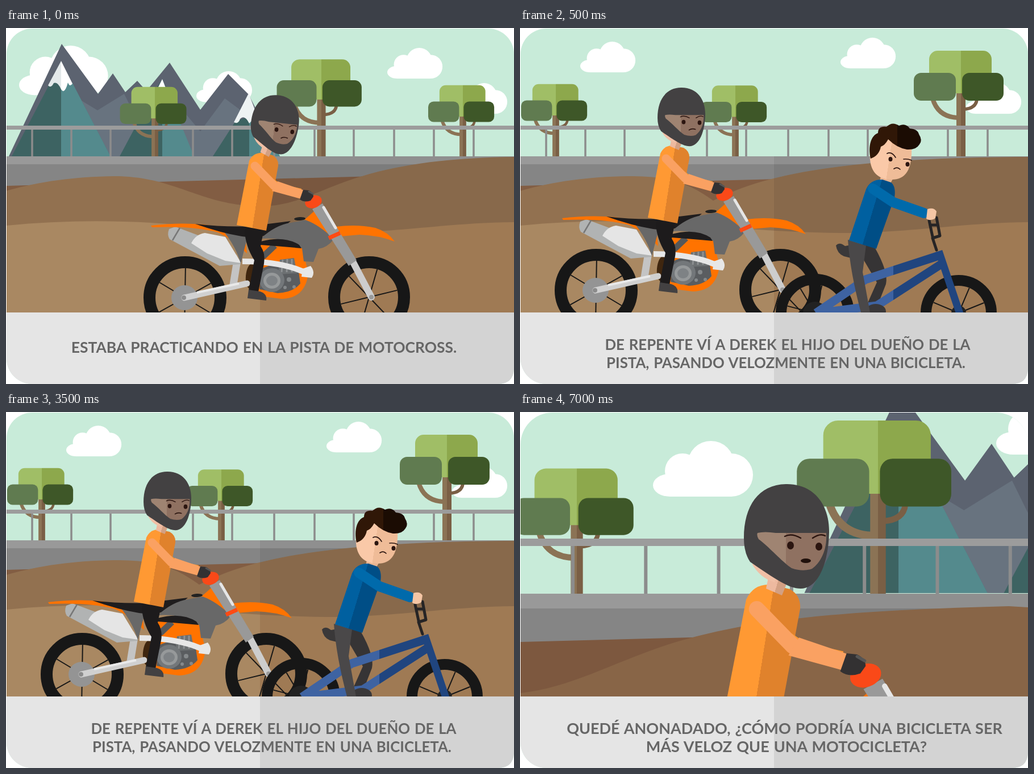
Animation, 894 px wide and 627 px high, one loop 8000 ms. Source, as an HTML page:

```html
<!DOCTYPE html>
<html lang="es">
<head>
<meta charset="utf-8">
<title>Pista de motocross</title>
<style>
  html, body { margin: 0; width: 100%; height: 100%; overflow: hidden; background: #fff; }
  svg { display: block; width: 894px; height: 627px; }
  text { font-family: Lato, sans-serif; font-weight: 700; word-spacing: 1.5px; fill: #666; text-anchor: middle; }
</style>
</head>
<body>
<svg id="stage" viewBox="0 0 894 627"></svg>
<script>
const shape = (d, fill) => `<path d="${d}" fill="${fill}"/>`;
const line = (d, color, width, cap = 'butt') =>
  `<path d="${d}" fill="none" stroke="${color}" stroke-width="${width}" stroke-linecap="${cap}" stroke-linejoin="round"/>`;
const oval = (x, y, rx, ry, fill, turn = 0) =>
  `<ellipse cx="${x}" cy="${y}" rx="${rx}" ry="${ry}" fill="${fill}" transform="rotate(${turn} ${x} ${y})"/>`;
const box = (x, y, w, h, fill, r = 0) =>
  `<rect x="${x}" y="${y}" width="${w}" height="${h}" rx="${r}" fill="${fill}"/>`;
const group = (transform, body) => `<g transform="${transform}">${body}</g>`;
const use = (id, x, y, s = 1) => `<use href="#${id}" transform="translate(${x} ${y}) scale(${s})"/>`;

// Two flat colours meeting at (x, y); (dx, dy) points from the first to the second.
const split = (id, x, y, dx, dy, a, b) =>
  `<linearGradient id="${id}" gradientUnits="userSpaceOnUse" x1="${x - dx}" y1="${y - dy}" x2="${x + dx}" y2="${y + dy}">
   <stop offset=".5" stop-color="${a}"/><stop offset=".5" stop-color="${b}"/></linearGradient>`;

const card = (id, r) => `<clipPath id="${id}"><path d="M1,${r + 1} a${r},${r} 0 0 1 ${r},${-r} H${894 - r}
  a${r},${r} 0 0 1 ${r},${r} V601 Q892,627 866,627 H46 A45,45 0 0 1 1,582 Z"/></clipPath>`;

const cloud = oval(30, 78, 30, 20, '#fff') + oval(52, 53, 31, 31, '#fff') + oval(102, 41, 41, 41, '#fff') +
  oval(138, 60, 38, 38, '#fff') + box(30, 50, 108, 48, '#fff');

const tree =
  line('M-50,-102 Q-40,-68 -3,-68', '#8b7355', 8) +
  line('M28,-100 Q26,-84 5,-83', '#7a5f45', 6) +
  box(-8, -130, 8, 140, '#8b7355') + box(0, -130, 8, 140, '#7a5f45') +
  box(-56, -186, 110, 75, 'url(#leaf)', 15) +
  box(-83, -147, 74, 49, '#607b50', 13) + box(2, -147, 73, 49, '#3e5728', 13);

const mountains =
  shape('M5,226 L98,28 L162,116 L188,80 L210,113 L231,93 L247,111 L288,61 L342,144 L391,81 L427,117 L482,226 Z', '#5c6370') +
  shape('M133,128 L161,145 L208,116 L262,226 H184 Z', '#68737f') +
  shape('M290,120 L342,182 L385,124 L420,150 L364,226 H300 Z', '#68737f') +
  shape('M10,226 L78,96 H97 V226 Z', '#3d6362') +
  shape('M97,88 L117,97 L184,226 H97 Z', '#548a8d') +
  shape('M97,58 L74,101 Q79,107 84,97 Q91,94 97,108 Z', '#e3e9ea') +
  shape('M97,58 L117,98 Q112,105 109,96 Q103,118 97,108 Z', '#fff') +
  shape('M200,226 L262,110 L275,90 V226 Z', '#3d6362') +
  shape('M275,90 L331,226 H275 Z', '#548a8d') +
  shape('M275,90 L264,112 L275,116 L283,111 Z', '#fff') +
  shape('M364,226 L404,164 L428,156 V226 Z', '#3d6362') +
  shape('M428,125 L482,226 H428 Z', '#548a8d') +
  shape('M427,115 L401,166 Q409,170 412,160 Q420,152 428,168 L442,154 Z', '#eef3f3');

const spokes = (x, y, r, start, count) => Array.from({ length: count }, (_, i) => {
  const a = start + i * 2 * Math.PI / count;
  return line(`M${x},${y} L${x + r * Math.cos(a)},${y + r * Math.sin(a)}`, '#171717', 2);
}).join('');
const wheel = (x, y, r, width, start, count) => spokes(x, y, r - width, start, count) +
  `<circle cx="${x}" cy="${y}" r="${r - width / 2}" fill="none" stroke="#171717" stroke-width="${width}"/>`;

const motorbike =
  wheel(315, 475, 73, 21, 0.54, 6) + wheel(639, 474, 72, 21, -0.24, 6) +
  oval(314, 475, 23, 22, '#949494') +
  line('M406,415 L400,452', '#c4c4c4', 13) +
  shape('M450,376 L520,385 L532,430 Q528,476 485,477 L446,472 L435,440 Z', '#ff7300') +
  shape('M449,424 L480,412 L514,422 L518,450 Q505,466 478,467 L446,460 Z', '#5a5d60') +
  shape('M482,408 L507,405 L512,432 L479,434 Z', '#6c7072') +
  line('M487,408 L485,430 M495,407 L494,430 M503,407 L503,430', '#8d9092', 3) +
  oval(468, 444, 22, 21, '#73777a') + oval(468, 445, 15, 14, '#96999a') + oval(468, 445, 10, 9, '#7e8285') +
  oval(498, 443, 4, 4, '#85898b') + oval(507, 456, 3, 3, '#85898b') + oval(491, 457, 3, 3, '#85898b') +
  line('M452,403 L473,383', '#55585a', 11) +
  oval(431, 437, 9, 22, '#3f260f', 5) +
  line('M314,475 L424,450', '#d0d0d0', 11, 'round') + line('M336,466 L410,450', '#e9e9e9', 4) +
  oval(313, 475, 4, 4, '#8b8b8b') +
  shape('M298,350 L338,365 L406,400 L413,416 L376,419 L288,372 Q283,364 287,354 Z', '#b1b3b3') +
  line('M306,352 L293,374', '#777', 2.5) +
  shape('M326,379 Q334,363 350,361 L386,368 L414,414 L386,410 L354,397 Z', '#e5e5e5') +
  shape('M255,348 Q302,342 348,346 L420,360 L424,397 Q401,373 373,360 Q330,348 257,351 Z', '#ff7300') +
  shape('M382,357 L428,356 L413,415 Q405,385 382,357 Z', '#686868') +
  shape('M333,345 Q386,351 430,349 L501,340 L480,358 Q448,372 415,367 Q378,361 333,345 Z', '#1f1d1e') +
  shape('M525,338 L543,322 L574,357 L577,373 L550,385 Z', '#ff7300') +
  shape('M448,371 Q474,347 501,343 L527,338 Q552,347 577,372 Q565,387 550,389 L541,412 L524,411 L521,388 Q490,368 448,371 Z', '#686868') +
  shape('M448,376 Q490,365 516,382 L520,388 Q488,385 448,382 Z', '#1f1d1e') +
  oval(517, 336, 10, 3, '#222', -3) +
  line('M416,411 Q472,411 510,424 L531,432', '#e7e7e7', 10) +
  shape('M522,424 L536,419 Q545,430 538,440 L520,438 Z', '#e7e7e7') +
  shape('M580,350 Q617,345 650,352 Q672,359 684,376 Q655,365 622,364 L588,367 Z', '#ff7300') +
  line('M608,407 L643,474', '#cdcdcd', 12, 'round') +
  shape('M539,319 L557,309 L617,409 L603,419 Z', '#999') +
  line('M559,316 L580,352', '#e6e6e6', 5, 'round') +
  line('M568,370 L588,361', '#ff4a14', 7) +
  oval(643, 474, 4, 4, '#999') +
  oval(541, 306, 15, 11, '#fa4918', -18);

const riderBody =
  shape('M424,350 L454,355 L448,384 Q457,397 454,415 L444,465 L427,462 L437,409 Q421,384 420,356 Z', '#1d1b1c') +
  shape('M427,461 L447,464 Q460,468 458,480 L425,476 Z', '#434142') +
  shape('M428,234 Q435,219 451,220 L469,224 Q480,230 479,243 L458,357 L406,347 Z', 'url(#shirt)') +
  shape('M471,266 L484,275 L520,283 L517,299 L473,286 Z', '#ff9933') +
  line('M438,243 L472,278', '#faa162', 15, 'round') +
  shape('M468,287 L478,270 L525,286 L519,301 Z', '#faa162') +
  shape('M523,285 L533,286 Q541,290 541,297 L536,304 Q525,308 517,302 Z', '#333132') +
  line('M533,288 L540,292', '#555', 3, 'round');

const brows = 'M466,219 Q478,213 494,222 M515,222 Q528,213 537,218';
const head = mouth =>
  shape('M438,287 L471,298 L461,323 L433,311 Z', 'url(#neck)') +
  shape('M408,267 Q422,292 448,300 L455,285 Z', '#f0bfa5') +
  shape('M394,222 C394,165 420,128 468,127 C519,126 545,166 544,212 C543,263 526,311 494,311 C473,311 449,294 405,264 Q394,248 394,222 Z', '#434142') +
  shape('M418,213 Q430,210 450,213 H539 C541,244 528,266 514,276 Q498,282 478,275 C461,264 437,236 420,224 Q416,217 418,213 Z', 'url(#visor)') +
  oval(476, 235, 6, 7, '#2b1510') + oval(526, 237, 6, 7, '#2b1510') +
  line(brows, '#2b1510', 2.5, 'round') + mouth;
const frown = line('M493,260 Q502,254 513,258', '#2b1510', 3, 'round');
const gasp = oval(503, 262, 9, 4, '#21110c');

const bicycle =
  wheel(519, 502, 69, 19, 0.25, 8) + wheel(772, 502, 67, 19, 0.4, 8) +
  oval(519, 502, 21, 20, '#222') + oval(772, 502, 13, 13, '#222') +
  shape('M556,383 Q562,376 572,384 L583,382 L586,406 L570,402 Q558,397 556,383 Z', '#3a3839') +
  shape('M599,380 L624,386 Q649,430 644,451 L628,492 L612,484 L628,448 L604,407 Z', '#363435') +
  line('M521,502 L608,443 L737,401 M525,502 L628,489 L741,416', 'url(#frame)', 15) +
  line('M737,393 L774,503', '#20457f', 13) +
  line('M733,391 L726,370 L739,366 L733,334 M727,372 L720,339 L728,326 M722,347 L734,347', '#262425', 5, 'round') +
  oval(626, 499, 18, 13, '#3a3839');

const boy =
  shape('M577,373 L609,383 L603,430 L616,501 H600 Q581,430 577,373 Z', '#4a4849') +
  shape('M636,258 L656,266 L649,279 L632,273 Z', '#e7b491') +
  shape('M609,284 Q617,266 638,267 L653,272 Q662,279 659,299 L627,389 L579,374 Z', 'url(#sweater)') +
  line('M621,283 L657,307 L711,326', '#006aab', 18, 'round') +
  shape('M717,319 Q728,315 733,323 L731,335 Q723,341 715,336 Z', '#f5c6a5') +
  shape('M616,220 C614,250 627,267 654,267 C680,267 691,248 689,205 L640,190 Z', 'url(#face)') +
  shape('M617,230 C612,208 618,189 630,185 Q630,172 645,174 Q655,164 667,172 Q679,167 686,177 Q700,178 702,187 Q709,198 703,205 Q697,215 681,214 Q663,211 648,196 Q642,207 635,209 Q632,225 617,230 Z', 'url(#hair)') +
  oval(652, 231, 3.5, 4, '#2b1510') + oval(682, 240, 3.5, 4, '#2b1510') +
  line('M646,221 Q654,217 661,228 M675,231 Q682,230 689,233 M658,248 Q664,244 669,249', '#2b1510', 1.7, 'round');

const railing = (y, height, posts, postWidth, bottom) =>
  posts.map(x => box(x - postWidth / 2, y, postWidth, bottom - y, '#8c8c8c')).join('') +
  box(0, y, 894, height, '#9c9c9c');

const posts = [46, 115, 184, 329, 398, 472, 543, 612, 683, 753, 823];
const widePosts = Array.from({ length: 7 }, (_, i) => 93 + 128.3 * i);

const track = hill =>
  railing(172, 7, posts, 3.5, 227) +
  box(0, 226, 894, 15, '#999') + box(0, 240, 894, 60, '#858585') +
  shape('M0,278 L300,270 L650,261 V400 H0 Z', '#825d43') +
  shape(hill, '#927150') +
  '<rect x="447" y="226" width="447" height="276" opacity=".065"/>' +
  shape('M0,348 C100,338 200,338 300,346 C400,354 480,361 580,361 C700,359 780,343 894,342 V502 H0 Z', 'url(#sand)');

const caption = (size, rows) => box(0, 501, 447, 126, '#e5e5e5') + box(447, 501, 447, 126, '#d3d3d3') +
  rows.map(([x, y, words]) => `<text x="${x}" y="${y}" font-size="${size}">${words}</text>`).join('');

const scene = (clip, body, size, rows) =>
  `<g class="scene" clip-path="url(#${clip})" visibility="hidden">${box(0, 0, 894, 627, '#c8ebd9')}${body}${caption(size, rows)}</g>`;

const practice =
  use('cloud', 23, 31, .89) + use('cloud', 335, 76, .557) + use('cloud', 671, 35, .552) + use('cloud', 785, 97, .552) +
  mountains +
  use('tree', 262, 241.5, .74) + use('tree', 555, 231, .945) + use('tree', 804, 237.5, .735) +
  track('M0,287 C60,270 120,262 190,261 C300,261 340,313 450,314 C560,312 580,231 894,227 V400 H0 Z') +
  motorbike + riderBody +
  group('translate(189 13) rotate(6 284 157) translate(21.4 34) scale(.56)', head(frown));

const overtaken =
  use('cloud', 106, 24, .552) + use('cloud', 564, 17, .552) + use('cloud', 785, 97, .552) +
  use('tree', 63, 235.5, .735) + use('tree', 379, 238, .735) + use('tree', 776, 226) +
  track('M0,287 C60,270 120,262 190,261 C250,261 290,267 340,304 C400,275 500,228 894,227 V400 H0 Z') +
  group('translate(-181 -13)', motorbike + riderBody) +
  group('translate(21.4 34) scale(.56)', head(frown)) +
  bicycle + boy;

const amazed =
  use('cloud', 234, 51) + use('cloud', 838, -23) +
  group('translate(491.5 -88) scale(1.8)', mountains) +
  use('tree', 100, 347, 1.33) + use('tree', 630, 335, 1.72) +
  railing(223, 13, widePosts, 6, 321) +
  box(0, 320, 447, 27, '#999') + box(447, 320, 447, 27, '#8f8f8f') +
  box(0, 346, 447, 70, '#858585') + box(447, 346, 447, 70, '#7c7c7c') +
  shape('M0,405 L420,394 V501 H0 Z', '#7d583f') +
  shape('M0,495 C100,485 185,428 300,398 C420,366 560,350 860,342 L894,344 V502 H0 Z', '#886547') +
  group('translate(-398 -105) scale(1.86)', motorbike + riderBody) + head(gasp);

const stage = document.getElementById('stage');
stage.innerHTML = `<defs>
  ${card('card', 45)}${card('wideCard', 56)}
  ${split('leaf', 0, 0, 100, 0, '#a0be66', '#8da84c')}
  ${split('sand', 447, 420, 447, 0, '#a98862', '#9f7a54')}
  ${split('shirt', 444, 286, 133, 21, '#ff9933', '#e0822c')}
  ${split('neck', 452, 305, 30, 9, '#edb99f', '#d3a083')}
  ${split('visor', 468, 240, 90, 0, '#9f8472', '#8f7161')}
  ${split('frame', 657, 440, 140, 0, '#3e63a2', '#20457f')}
  ${split('sweater', 620, 324, 113, 34, '#0060a0', '#004e86')}
  ${split('face', 650, 230, 80, 12, '#fac9a8', '#efbc98')}
  ${split('hair', 664, 190, 80, 0, '#301707', '#1b0c03')}
  <g id="cloud">${cloud}</g><g id="tree">${tree}</g></defs>` +
  scene('card', practice, 26.4, [[454, 572, 'ESTABA PRACTICANDO EN LA PISTA DE MOTOCROSS.']]) +
  scene('card', overtaken, 25.8, [
    [471, 567, 'DE REPENTE VÍ A DEREK EL HIJO DEL DUEÑO DE LA'],
    [468, 599, 'PISTA, PASANDO VELOZMENTE EN UNA BICICLETA.']]) +
  scene('wideCard', amazed, 27, [
    [465.5, 567, 'QUEDÉ ANONADADO, ¿CÓMO PODRÍA UNA BICICLETA SER'],
    [469, 599, 'MÁS VELOZ QUE UNA MOTOCICLETA?']]);

const scenes = [...stage.querySelectorAll('.scene')];
const ends = [500, 5500, 8000];
const start = performance.now();

function draw(now) {
  const time = Math.max(0, now - start) % 8000;
  const current = ends.findIndex(end => time < end);
  scenes.forEach((s, i) => s.setAttribute('visibility', i === current ? 'visible' : 'hidden'));
  requestAnimationFrame(draw);
}
draw(start);
</script>
</body>
</html>
```
